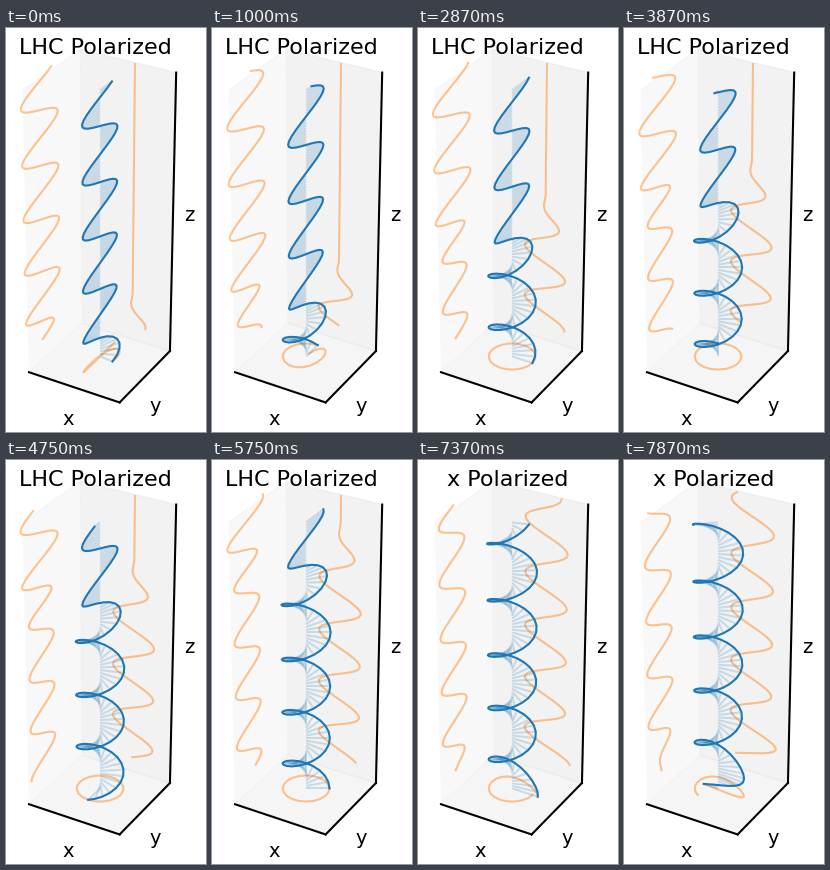
Write a matplotlib script that moves like this. It is 200 px wide and 404 px high and loops after 8000 ms.

```python
import numpy as np
import matplotlib.pyplot as plt
from matplotlib.animation import FuncAnimation
from mpl_toolkits.mplot3d.art3d import Line3DCollection

W, H, DPI = 200, 404, 100
FRAMES, INTERVAL = 160, 50
STEP = 125             # ms between moves of the wave

PERIOD = 12            # steps per optical cycle
SEGMENT = 60           # steps between polarization changes
SWITCH = -2            # step at which the first change is half done
LENGTH = 5             # box height in wavelengths
PER_WAVE = 20          # samples per wavelength
LIM, WALL = 1.5, 2.0

BLUE, ORANGE = "tab:blue", "tab:orange"

# Jones vectors
Y_POL = np.array([[0], [1]])
LHC = np.array([[1], [1j]]) / np.sqrt(2)
X_POL = np.array([[1], [0]])

z = np.arange(LENGTH * PER_WAVE) / PER_WAVE
zero, one = np.zeros_like(z), np.ones_like(z)


def ramp(age):
    """Smooth 0 to 1 step, one optical cycle wide."""
    return 0.5 + 0.5 * np.sin(np.pi * np.clip(age / PERIOD, -0.5, 0.5))


def field(n):
    """Transverse field along z, travelling upwards."""
    phase = 2 * np.pi * (n / PERIOD - z + 1 / 12)
    age = n - PERIOD * z - SWITCH
    a, b = ramp(age), ramp(age - SEGMENT)
    jones = (1 - a) * Y_POL + (a - b) * LHC + b * X_POL
    return (jones * np.exp(1j * phase)).real


fig = plt.figure(figsize=(W / DPI, H / DPI), dpi=DPI, facecolor="white")

# Square axes larger than the figure, placed by the centre of projection
side, cx, cy = 346.5, 94.1, 199.5
off = side * 0.95 / 1.85
ax = fig.add_axes(
    [(cx - off) / W, (H - cy - off) / H, side / W, side / H],
    projection="3d", computed_zorder=False,
)
ax.view_init(elev=30, azim=-60)
ax.set_box_aspect((1, 1, 3))
pad = 25 / 24
ax.set_xlim(-LIM * pad, LIM * pad, view_margin=0)
ax.set_ylim(-LIM * pad, LIM * pad, view_margin=0)
ax.set_zlim(-LENGTH / 48, LENGTH * 49 / 48, view_margin=0)
for axis in (ax.xaxis, ax.yaxis, ax.zaxis):
    axis.set_ticks([])
    axis.line.set_linewidth(1.5)
    axis.line.set_color("black")


def label(x, y, text, size):
    return fig.text(x / W, 1 - y / H, text, fontsize=size, ha="center",
                    va="baseline", family="DejaVu Sans")


label(62.5, 397.4, "x", 14)
label(149, 384, "y", 14)
label(183, 193, "z", 14)
title = label(89.3, 26, "", 16)


def shadow():
    return ax.plot([], [], [], color=ORANGE, alpha=0.45, lw=1.5, zorder=2)[0]


left, right, floor = shadow(), shadow(), shadow()
wave, = ax.plot([], [], [], color=BLUE, lw=1.5, zorder=4)
spokes = Line3DCollection([[(0, 0, 0), (0, 0, 1)]], colors=BLUE, alpha=0.2,
                          linewidths=1.5, zorder=3)
ax.add_collection3d(spokes)


def update(k):
    # Snap to the nearest step of the slower wave clock
    n = int((k + 0.5) * INTERVAL // STEP)
    x, y = field(n)
    wave.set_data_3d(x, y, z)
    left.set_data_3d(-WALL * one, y, z)
    right.set_data_3d(x, WALL * one, z)
    first = slice(PER_WAVE + 1)
    floor.set_data_3d(x[first], y[first], zero[first])
    roots = np.column_stack([zero, zero, z])
    tips = np.column_stack([x, y, z])
    spokes.set_segments(np.stack([roots, tips], axis=1))
    title.set_text("LHC Polarized" if n < SWITCH + SEGMENT else "x Polarized")
    return wave, left, right, floor, spokes, title


anim = FuncAnimation(fig, update, frames=FRAMES, interval=INTERVAL,
                     init_func=lambda: update(0), repeat=True, repeat_delay=0,
                     blit=False)
plt.show()
```
